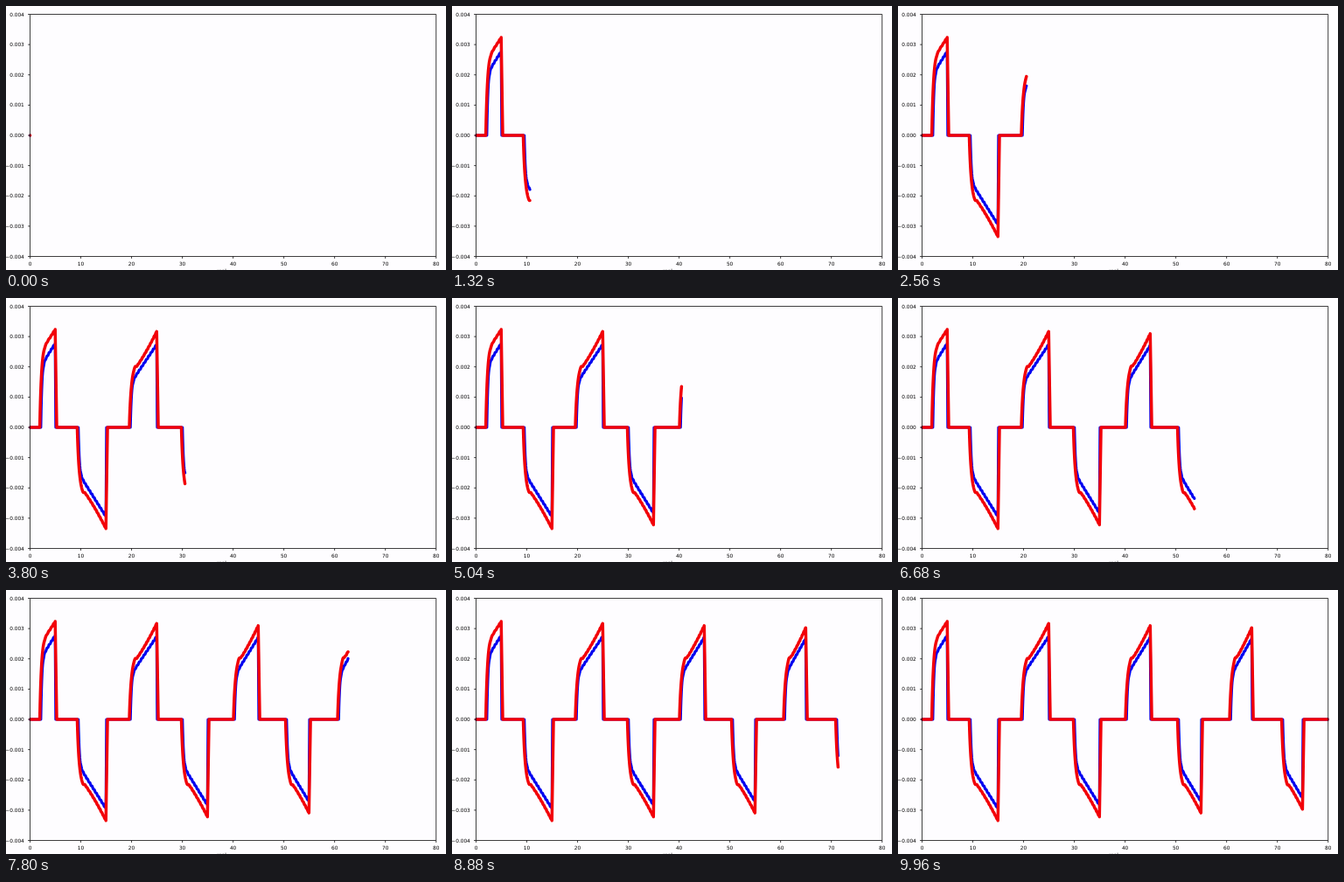
Animation, 503 px wide and 302 px high, one loop 10 s. Source, as an HTML page:

```html
<!DOCTYPE html>
<html lang="en">
<head>
<meta charset="utf-8">
<style>
html, body { margin: 0; width: 100%; height: 100%; overflow: hidden; background: #fefdff; }
svg { display: block; width: 503px; height: 302px; }
text { font: 5.8px "DejaVu Sans", sans-serif; fill: #000; }
.line { fill: none; stroke-linecap: round; stroke-linejoin: round; }
.axis { fill: none; stroke: #000; stroke-width: .75; }
</style>
</head>
<body>
<svg viewBox="0 0 503 302">
  <clipPath id="area"><rect x="26.5" y="9" width="466" height="278"/></clipPath>
  <g clip-path="url(#area)">
    <path id="blue" class="line" stroke="#0000f0" stroke-width="3.2"/>
    <path id="red" class="line" stroke="#f20008" stroke-width="3.5"/>
  </g>
  <path id="axis" class="axis"/>
  <g id="labels"></g>
</svg>
<script>
const LEFT = 27.5, RIGHT = 491.7, TOP = 9.5, BOTTOM = 286.5, ZERO = 148;
const UNIT = (RIGHT - LEFT) / 80;
const FRAME = 40, FRAMES = 250, PULSES = 8;
const $ = id => document.getElementById(id);

function label(x, y, str, anchor) {
  const t = document.createElementNS("http://www.w3.org/2000/svg", "text");
  t.setAttribute("x", x);
  t.setAttribute("y", y);
  t.setAttribute("text-anchor", anchor);
  t.textContent = str;
  $("labels").append(t);
}

function drawAxes() {
  let d = `M${LEFT} ${TOP}H${RIGHT}V${BOTTOM}H${LEFT}Z`;
  for (let i = 0; i <= 8; i++) {
    const x = LEFT + (RIGHT - LEFT) * i / 8;
    const y = TOP + (BOTTOM - TOP) * i / 8;
    const v = 4 - i;
    d += `M${x} ${BOTTOM}v2.4M${LEFT} ${y}h-2.4`;
    label(x, 297.2, i * 10, "middle");
    label(20.8, y + 2.1, (v < 0 ? "\u2212" : "") + "0.00" + Math.abs(v), "end");
  }
  $("axis").setAttribute("d", d);
  label(241, 304.9, "real", "start");
}

// Each pulse rises quickly to a knee, then ramps up to its peak.
// Knees: [first pulse, later positive, negative]; peaks: [start, loss per pulse]
const styles = {
  red: { knees: [90, 61, 66], tau: 1.8, power: 1.3, up: [112, 1.2], down: [118, 2.2],
         bump: 3.5, stair: .55, delay: 0, fall: 1.8 },
  blue: { knees: [70, 50, 52], tau: 1.15, power: 1, up: [96, .6], down: [104, 2],
          bump: 0, stair: .95, delay: 1.2, fall: .7 }
};

// Monotonic staircase around a straight ramp
function stairs(h, amount, size = 4) {
  const turn = 2 * Math.PI / size;
  return h - amount * Math.sin(h * turn) / turn;
}

function buildTrace(s) {
  const pts = [[LEFT, ZERO]];
  for (let k = 0; k < PULSES; k++) {
    const negative = k % 2 === 1;
    const end = LEFT + UNIT * (5 + 10 * k) - .3;
    const len = (k ? 34.3 - 1.5 * k : 17.6) - s.delay;
    const knee = s.knees[negative ? 2 : k ? 1 : 0];
    const [base, loss] = negative ? s.down : s.up;
    const ramp = base - loss * k - knee;
    const side = negative ? 1 : -1;
    for (let dx = 0; dx < len; dx += .35) {
      const rise = knee * (1 - Math.exp(-dx / s.tau));
      const bump = k ? s.bump * Math.exp(-(((dx - 6) / 2) ** 2)) : 0;
      const climb = stairs(ramp * (dx / len) ** s.power, s.stair);
      pts.push([end - len + dx, ZERO + side * (rise + bump + climb)]);
    }
    pts.push([end, ZERO + side * (knee + ramp)], [end + s.fall, ZERO]);
  }
  pts.push([RIGHT, ZERO]);
  return pts;
}

function pathTo(pts, limit) {
  let d = "M" + pts[0];
  for (let i = 1; i < pts.length; i++) {
    const [x0, y0] = pts[i - 1], [x1, y1] = pts[i];
    if (x1 >= limit) {
      const k = (limit - x0) / (x1 - x0);
      return d + `L${limit} ${y0 + (y1 - y0) * k}`;
    }
    d += "L" + pts[i];
  }
  return d;
}

const traces = { blue: buildTrace(styles.blue), red: buildTrace(styles.red) };

function draw(ms) {
  const step = Math.floor(ms / FRAME) % FRAMES;
  const limit = LEFT + (RIGHT - LEFT) * step / (FRAMES - 1);
  for (const c in traces) $(c).setAttribute("d", pathTo(traces[c], limit));
}

drawAxes();
draw(0);
const begin = performance.now();
(function tick() {
  draw(performance.now() - begin);
  requestAnimationFrame(tick);
})();
</script>
</body>
</html>
```
